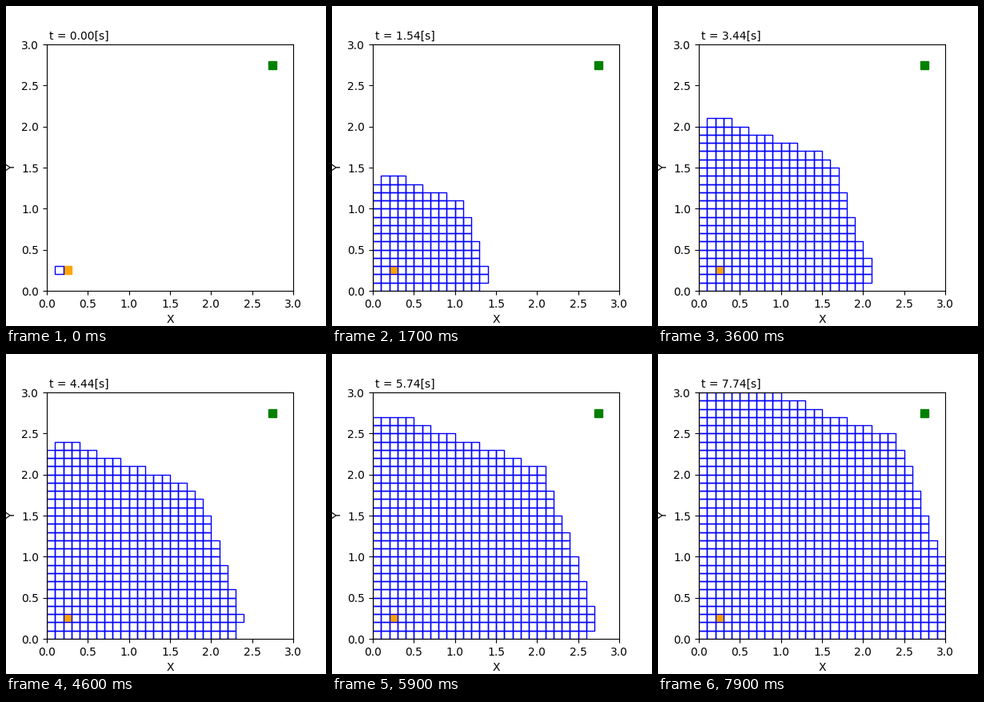
A matplotlib script for the animation above (8000 ms loop, 400x400 px).

```python
import matplotlib.pyplot as plt
from matplotlib.animation import FuncAnimation
from matplotlib.collections import PolyCollection
from matplotlib.patches import Rectangle

N = 30                      # cells per side
SIZE = 0.1                  # cell width
START, GOAL = (2, 2), (27, 27)
STRAIGHT, DIAGONAL = 11, 15  # relative step costs
FRAMES, INTERVAL = 80, 100


def cost(cell):
    """Cheapest 8-connected path cost from the start."""
    dx, dy = abs(cell[0] - START[0]), abs(cell[1] - START[1])
    short, long = sorted((dx, dy))
    return STRAIGHT * (long - short) + DIAGONAL * short


def outline(cell):
    x, y = cell[0] * SIZE, cell[1] * SIZE
    return [(x, y), (x + SIZE, y), (x + SIZE, y + SIZE), (x, y + SIZE)]


def mark(cell, color):
    ax.add_patch(Rectangle((cell[0] * SIZE, cell[1] * SIZE), SIZE, SIZE,
                           fc=color, ec=color, lw=1))


def step_at(frame):
    """Search step shown in a frame: ten per frame after a short start."""
    return (0, 2)[frame] if frame < 2 else 10 * frame - 16


# Cells in the order the search closes them; ties go by x, then y.
cells = [(x, y) for x in range(N) for y in range(N) if (x, y) != START]
cells.sort(key=lambda c: (cost(c), c))
outlines = [outline(c) for c in cells]

plt.rcParams["font.family"] = "DejaVu Sans"
fig, ax = plt.subplots(figsize=(4, 4), dpi=100)
ax.set_aspect("equal")
ax.set(xlim=(0, N * SIZE), ylim=(0, N * SIZE), xlabel="X", ylabel="Y")
ticks = [0.5 * i for i in range(7)]
ax.set_xticks(ticks)
ax.set_yticks(ticks)

mark(START, "orange")
mark(GOAL, "green")
visited = PolyCollection([], facecolors="none", edgecolors="blue",
                         linewidths=1, zorder=2)
ax.add_collection(visited, autolim=False)
clock = ax.text(0.01, 1.02, "", transform=ax.transAxes, fontsize=10)


def update(frame):
    step = step_at(frame)
    visited.set_verts(outlines[:step + 1])
    clock.set_text(f"t = {step / 100:.2f}[s]")
    return visited, clock


anim = FuncAnimation(fig, update, frames=FRAMES, interval=INTERVAL,
                     init_func=lambda: update(0), repeat=True, repeat_delay=0)
plt.show()
```
